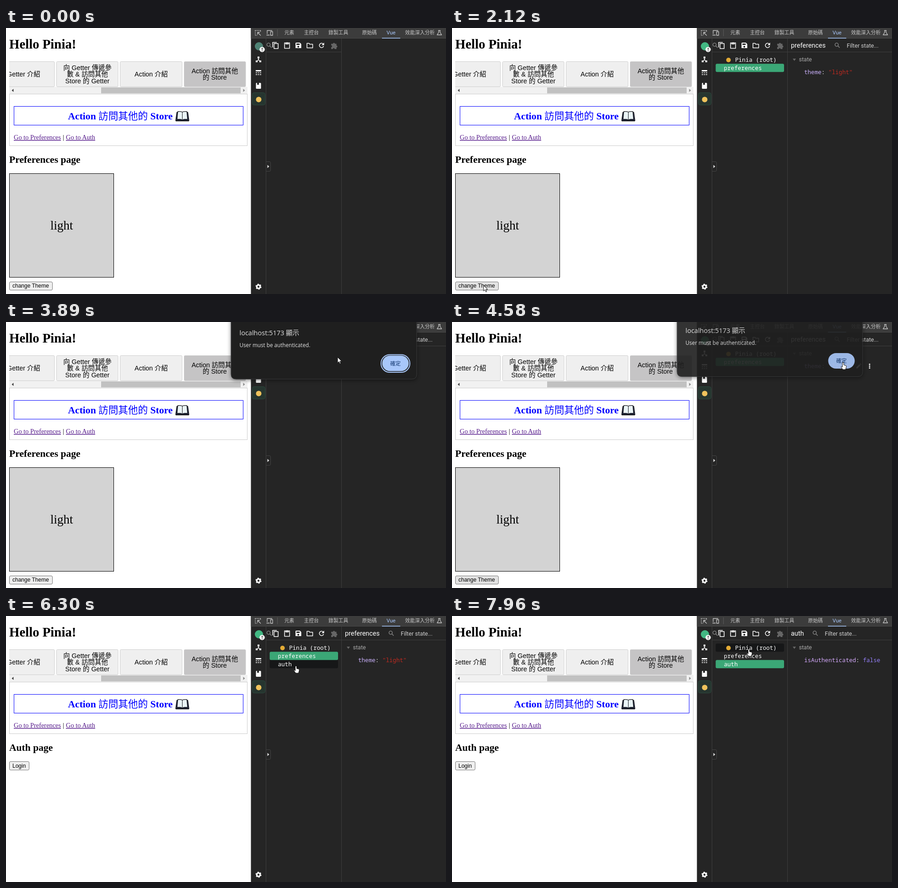
These frames come from a looping animation (962 px wide and 582 px high, 8000 ms). An HTML page:

```html
<!DOCTYPE html>
<html lang="zh-Hant">
<head>
<meta charset="utf-8">
<style>
  html, body { margin: 0; width: 100%; height: 100%; overflow: hidden; background: #fff; }
  svg { display: block; width: 962px; height: 582px; }
  text { white-space: pre; }
  .serif { font-family: "Liberation Serif", "Noto Sans CJK TC", serif; }
  .h1 { font-size: 28.8px; font-weight: bold; }
  .h2 { font-size: 21.6px; font-weight: bold; }
  .link { font-size: 14.4px; fill: #551a8b; text-decoration: underline; }
  .tab { font: 300 14.4px "Liberation Sans", "Noto Sans CJK TC", sans-serif; text-anchor: middle; }
  .button { font: 12px "Liberation Sans", sans-serif; }
  .box { fill: #efefef; stroke: #767676; }
  .menu { font: 10.8px Roboto, "Noto Sans CJK TC", sans-serif; fill: #c7c7c7; }
  .menu .active { font-size: 11.5px; fill: #a8c7fa; }
  .ui { font: 12.6px Roboto, sans-serif; fill: #fff; }
  .mono { font: 12.6px "Noto Sans Mono", "DejaVu Sans Mono", monospace; fill: #fff; }
  .alert { font-family: "Open Sans", "Noto Sans CJK TC", sans-serif; fill: #e3e3e3; }
  .icon { fill: none; stroke: #fff; stroke-width: 1.5; stroke-linejoin: round; }
  .solid { fill: #fff; stroke: none; }
  .rule { stroke: #3e3e3e; }
</style>
</head>
<body>
<svg viewBox="0 0 962 582">
  <defs>
    <clipPath id="tabClip"><rect x="7" y="70" width="521" height="60"/></clipPath>
    <g id="lens" fill="none" stroke="#8a8a8a" stroke-width="1.4">
      <circle cx="-1.5" cy="-1.5" r="3.6"/><path d="M1 1l4 4"/>
    </g>
  </defs>

  <!-- Web page -->
  <rect width="536" height="582" fill="#fff"/>
  <text class="serif h1" x="7" y="45">Hello Pinia!</text>
  <g clip-path="url(#tabClip)">
    <g fill="#efefef" stroke="#cfcfcf">
      <rect x="-29.5" y="73.5" width="135.5" height="55" rx="2"/>
      <rect x="110.5" y="73.5" width="134.5" height="55" rx="2"/>
      <rect x="249.5" y="73.5" width="135.5" height="55" rx="2"/>
      <rect x="389.5" y="73.5" width="134.5" height="55" rx="2" fill="#c5c4c5"/>
    </g>
    <g class="tab">
      <text x="38.5" y="106">Getter 介紹</text>
      <text x="178" y="92">向 Getter 傳遞參</text>
      <text x="178" y="106">數 &amp; 訪問其他</text>
      <text x="178" y="121">Store 的 Getter</text>
      <text x="317.5" y="106">Action 介紹</text>
      <text x="456.5" y="99">Action 訪問其他</text>
      <text x="456.5" y="113">的 Store</text>
    </g>
  </g>
  <rect x="7" y="129" width="521" height="15" fill="#f1f1f1"/>
  <rect x="208" y="130" width="305" height="13" fill="#c1c1c1"/>
  <path d="M12.5 136.5l4-3.5v7z" fill="#404040"/>
  <path d="M522.5 136.5l-4-3.5v7z" fill="#8d8d8d"/>
  <rect x="7.5" y="144.5" width="520" height="113" fill="none" stroke="#ccc"/>
  <rect x="17.5" y="171.5" width="501" height="41" fill="none" stroke="#00f"/>
  <text class="serif h2" x="135.5" y="200" fill="#00f">Action <tspan font-weight="500">訪問其他的</tspan> Store</text>
  <g stroke="#16161c" stroke-width="1.3" stroke-linejoin="round">
    <path d="M373.5 184.5h24l2.5 18h-29z" fill="#26304a"/>
    <path d="M385.5 184q-4.500-2-10-1l-1.500 17q7-1 11.500 1 4.500-2 11.500-1l-1.500-17q-5.500-1-10 1z" fill="#eaf4f6"/>
    <path d="M385.5 184v16" stroke-width="1"/>
  </g>
  <path d="M371 203.500h29" stroke="#16161c" stroke-width="1.3"/>
  <g class="serif">
    <text class="link" x="17" y="244">Go to Preferences</text>
    <text x="124" y="244" font-size="14.4">|</text>
    <text class="link" x="131" y="244">Go to Auth</text>
  </g>

  <g id="preferencesPage">
    <text class="serif h2" x="7" y="295">Preferences page</text>
    <rect x="7.5" y="318.5" width="228" height="227" fill="#d3d3d3" stroke="#000"/>
    <text class="serif" x="97" y="441" font-size="27">light</text>
    <rect id="themeButton" class="box" x="7.5" y="555.5" width="94" height="18" rx="2.5"/>
    <text class="button" x="14" y="568">change Theme</text>
  </g>
  <g id="authPage">
    <text class="serif h2" x="7" y="295">Auth page</text>
    <rect class="box" x="7.5" y="318.5" width="43" height="18.5" rx="2.5"/>
    <text class="button" x="14" y="332">Login</text>
  </g>

  <!-- Developer tools -->
  <rect x="535.5" width="427" height="582" fill="#252525"/>
  <rect x="535.5" width="427" height="23" fill="#3c3c3c"/>
  <path d="M536 22.5H962" stroke="#484848"/>
  <path class="rule" d="M568.5 23V582M733.5 23V582M569 52.5H733"/>
  <path d="M593.5 3v15" stroke="#5a5a5a"/>
  <g class="icon" style="stroke:#c7c7c7;stroke-width:1.3">
    <path d="M544.5 5.500h12" stroke-dasharray="2 1.5"/>
    <path d="M545 5v11h4" stroke-dasharray="2 1.5"/>
    <path d="M556.5 5v3M550 9.500v5m0-5h5m-5 0l7 7"/>
    <path d="M571 13V5.500h11M569.5 15.500h7M578.5 8h4.500v8h-4.500z"/>
    <path d="M945 5.500h5m-4 0v4l-3.500 5.500h10L949 9.500v-4"/>
  </g>
  <g class="menu">
    <text x="608.5" y="14">元素</text>
    <text x="651.5" y="14">主控台</text>
    <text x="705" y="14">錄製工具</text>
    <text x="778.5" y="14">原始碼</text>
    <text class="active" x="832" y="14">Vue</text>
    <text x="872.5" y="14">效能深入分析</text>
  </g>
  <rect x="822" y="21.5" width="40" height="1.5" fill="#a8c7fa"/>

  <circle id="connection" cx="553" cy="40" r="9"/>
  <circle cx="560" cy="47" r="5.8" fill="#fff"/>
  <path d="M560 43.500v4M560 49v1.500" stroke="#222" stroke-width="1.7"/>
  <use href="#lens" x="575.5" y="38"/>
  <g class="icon">
    <path d="M583 42.500V31.500h9M586 34h9v11h-9z"/>
    <path d="M609 32.500h11v12h-11zM611.5 33h6v2h-6zM614.5 31v2"/>
    <path class="solid" fill-rule="evenodd" d="M634 32h8.500l3 3v9h-12.500v-11zM635 34v3h7v-3zM639 39a2 2 0 1 0 .1 0z"/>
    <path d="M658 33.500h4.500l1.500 2h6.500v8h-12.500z"/>
    <path d="M693.5 35a4.800 4.800 0 1 0 1 4.500"/>
    <path class="solid" d="M695.5 32v5.500H690z"/>
    <path class="solid" style="fill:#666" d="M711 34.500h4a2 2 0 1 1 4 0h3.500v4a2 2 0 1 1 0 4v3.500h-4a2 2 0 1 0-4 0H711v-4a2 2 0 1 0 0-4z"/>
    <path d="M552 64.500v5l-4 3.500m4-3.500l4 3.500"/>
    <path class="solid" d="M550 62.500h4v4h-4zM546 71h4v4h-4zM554 71h4v4h-4z"/>
    <path d="M546 93.500h12" stroke-width="3"/>
    <path d="M546 98h12M546 102h12" stroke-dasharray="3 1.5"/>
    <rect class="solid" x="546.5" y="120" width="11" height="13" rx="1.5"/>
    <path d="M549 120h4v5l-2-1.500-2 1.500z" fill="#252525" stroke="none"/>
    <circle cx="552" cy="566" r="3.7" stroke-width="3"/>
    <circle cx="552" cy="566" r="5.5" stroke-width="2" stroke-dasharray="2.88"/>
  </g>
  <rect x="538.5" y="141.5" width="28" height="27" rx="4" fill="#26352f" stroke="#2c493e"/>
  <circle cx="552.5" cy="156.5" r="6" fill="#efc25c"/>
  <path d="M569 292.500h7q2.500 0 2.500 2.500v16q0 2.500-2.500 2.500h-7" fill="#252525" stroke="#444"/>
  <path d="M571.5 299.500l4 3.500-4 3.500z" fill="#ddd"/>

  <g id="inspector">
    <path class="rule" d="M733 52.500H962"/>
    <rect id="hoverRow" x="576.5" width="149.5" height="18" rx="3" fill="#161718"/>
    <rect id="selectedRow" x="576.5" width="149.5" height="18" rx="3" fill="#3ba776"/>
    <circle cx="604.5" cy="70" r="5" fill="#e3ab35"/>
    <g class="mono">
      <text x="619" y="73.5">Pinia (root)</text>
      <text x="594.5" y="91.5">preferences</text>
      <text id="authItem" x="594.5" y="109.5">auth</text>
    </g>
    <text id="storeTitle" class="ui" x="741" y="43" style="font-size:14.4px"></text>
    <g id="filter">
      <use href="#lens" x="842.5" y="38"/>
      <text class="ui" x="863" y="42.5" style="fill:#d0d0d0">Filter state...</text>
    </g>
    <path d="M745 67h7l-3.500 5z" fill="#666"/>
    <text class="ui" x="758.5" y="73" style="fill:#aaa">state</text>
    <text id="themeState" class="mono" x="770" y="101"><tspan fill="#c9b0fb">theme</tspan>: <tspan fill="#c02a20">"light"</tspan></text>
    <text id="authState" class="mono" x="770" y="101"><tspan fill="#d3a8fb">isAuthenticated</tspan>: <tspan fill="#9580fa">false</tspan></text>
    <g id="rowTools" fill="#fff">
      <path d="M884 101.500v-2.500l6.500-6.500 2.500 2.500-6.500 6.500zM891.5 91.500l1-1 2.500 2.500-1 1z"/>
      <circle cx="913" cy="92.5" r="1.5"/><circle cx="913" cy="96.5" r="1.5"/><circle cx="913" cy="100.5" r="1.5"/>
    </g>
  </g>

  <!-- Browser alert -->
  <g id="alert" style="filter:drop-shadow(0 2px 4px #0007)">
    <path d="M492 -30H898V114q0 11-11 11H503q-11 0-11-11z" fill="#1f1f1f" stroke="#3a3b3c"/>
    <text class="alert" x="510.5" y="29" font-size="14.5">localhost:5173 顯示</text>
    <text class="alert" x="510.5" y="55" font-size="11.7">User must be authenticated.</text>
    <rect id="focusRing" x="820" y="71.5" width="63" height="38.5" rx="19" fill="none" stroke="#a8c7fa" stroke-width="2"/>
    <rect x="822.5" y="73.5" width="58" height="34" rx="17" fill="#a8c7fa"/>
    <text class="alert" x="851.5" y="94.5" font-size="11.5" text-anchor="middle" style="fill:#153a72">確定</text>
  </g>

  <g id="cursor" fill="#fff" stroke="#111" stroke-linejoin="round">
    <path id="arrow" d="M0 0v12.500l3-2.800 2 4.800 2-.9-2-4.600h4z"/>
    <path id="hand" d="M-1.5 9V1.200q1.500-1.800 3 0V6l4.500 1q1.500 1 1 3.500L5.500 16h-6l-4-5.500q0-2 3 0z"/>
  </g>
</svg>

<script>
const LOOP = 8000;
const STORE_READY = 190, ALERT_OPEN = 2400, ALERT_CLOSE = 4530, AUTH_ADDED = 4720;
const AUTH_PAGE = 5620, AUTH_SELECTED = 6370;
const ROW_TOP = 60, ROW_HEIGHT = 18;

// Pointer way-points: time, x, y
const pointerPath = [
  [520, 700, 590], [900, 672, 106], [1000, 672, 104], [1150, 885, 98], [1350, 844, 110],
  [1850, 69, 563], [2330, 69, 563], [2870, 626, 157], [3080, 545, 40], [3330, 522, 61],
  [3420, 522, 61], [4240, 855, 88], [4600, 855, 88], [5070, 187, 256], [5210, 187, 238],
  [5960, 187, 238], [6300, 634, 109], [6400, 634, 109], [6790, 920, 102], [7050, 800, 125],
  [7350, 938, 118], [7620, 780, 102], [7760, 648, 74], [7960, 649, 72]
];

const el = {};
document.querySelectorAll("svg [id]").forEach(node => el[node.id] = node);

const clamp = v => Math.min(1, Math.max(0, v));
const progress = (t, start, length) => clamp((t - start) / length);
const show = (node, visible) => node.style.display = visible ? "" : "none";

function pointerAt(t) {
  const next = pointerPath.findIndex(p => p[0] > t);
  if (next < 1) return pointerPath[next ? pointerPath.length - 1 : 0].slice(1);
  const [t0, x0, y0] = pointerPath[next - 1], [t1, x1, y1] = pointerPath[next];
  const p = (t - t0) / (t1 - t0), e = p * p * (3 - 2 * p);
  return [x0 + (x1 - x0) * e, y0 + (y1 - y0) * e];
}

function drawStores(t, x, y, blocked) {
  const hasAuth = t >= AUTH_ADDED, authSelected = t >= AUTH_SELECTED;
  const row = Math.floor((y - ROW_TOP) / ROW_HEIGHT);
  const overList = !blocked && x > 576 && x < 726 && row >= 0 && row < (hasAuth ? 3 : 2);
  const overState = !blocked && x > 745 && y > 86 && y < 108;
  const rowY = index => ROW_TOP + index * ROW_HEIGHT + 0.3;

  show(el.inspector, t >= STORE_READY);
  show(el.authItem, hasAuth);
  show(el.hoverRow, overList);
  el.hoverRow.setAttribute("y", rowY(row));
  el.selectedRow.setAttribute("y", rowY(authSelected ? 2 : 1));
  el.storeTitle.textContent = authSelected ? "auth" : "preferences";
  el.filter.setAttribute("transform", `translate(${authSelected ? -48 : 0})`);
  show(el.themeState, !authSelected);
  show(el.authState, authSelected);
  show(el.rowTools, overState && !authSelected);
  return overList || overState;
}

function drawAlert(t) {
  const opening = progress(t, ALERT_OPEN, 150), closing = progress(t, ALERT_CLOSE, 170);
  show(el.alert, opening > 0 && closing < 1);
  el.alert.style.opacity = opening * (1 - closing * closing);
  el.alert.setAttribute("transform", `translate(0 ${-18 * (1 - opening + closing)})`);
  show(el.focusRing, t < ALERT_CLOSE);
}

function render(t) {
  const [x, y] = pointerAt(t);
  const blocked = t >= ALERT_OPEN && t < ALERT_CLOSE;
  const pointing = drawStores(t, x, y, blocked);
  drawAlert(t);

  show(el.preferencesPage, t < AUTH_PAGE);
  show(el.authPage, t >= AUTH_PAGE);
  const overButton = x < 102 && y > 555 || t >= ALERT_CLOSE && t < 4700;
  el.themeButton.style.fill = overButton ? "#e3e3e3" : "#efefef";
  el.connection.setAttribute("fill", t < STORE_READY ? "#4f8375" : "#42b883");

  el.cursor.setAttribute("transform", `translate(${Math.round(x)} ${Math.round(y)})`);
  show(el.arrow, !pointing);
  show(el.hand, pointing);
}

const start = performance.now();
function tick() {
  render((performance.now() - start) % LOOP);
  requestAnimationFrame(tick);
}
tick();
</script>
</body>
</html>
```
